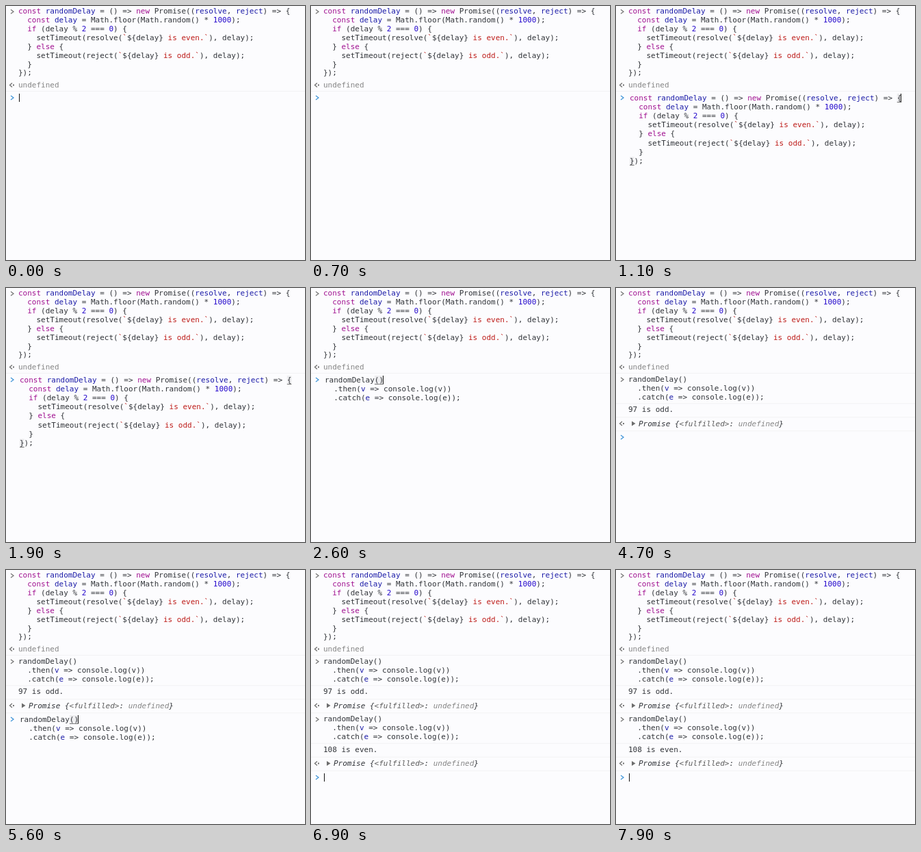
An HTML page with a canvas for the animation above (8 s loop, 437x371 px).

```html
<!DOCTYPE html>
<html lang="en">
<head>
<meta charset="utf-8">
<title>Console session</title>
<style>
  html, body { margin: 0; width: 100%; height: 100%; overflow: hidden; background: #fcfcfe; }
  canvas { display: block; width: 437px; height: 371px; }
</style>
</head>
<body>
<canvas></canvas>
<script>
const WIDTH = 437, HEIGHT = 371, LOOP = 8000, BLINK = 500;
const FONT = '11px "DejaVu Sans Mono", monospace';
const INK = '#303338', GREY = '#858585', PROMPT = '#4296d8';

const definition = [
  'const randomDelay = () => new Promise((resolve, reject) => {',
  '  const delay = Math.floor(Math.random() * 1000);',
  '  if (delay % 2 === 0) {',
  '    setTimeout(resolve(`${delay} is even.`), delay);',
  '  } else {',
  '    setTimeout(reject(`${delay} is odd.`), delay);',
  '  }',
  '});'
];
const call = ['randomDelay()', '  .then(v => console.log(v))', '  .catch(e => console.log(e));'];

// Prompt states; brackets are [line, column] pairs.
const definitionBrackets = [[0, 59], [7, 0]];
const callBrackets = [[0, 11], [0, 12]];
const states = [
  { start: 0, y: 134, runs: 0 },
  { start: 1000, y: 134, runs: 0, code: definition, brackets: definitionBrackets },
  { start: 2500, y: 134, runs: 0, code: call, brackets: callBrackets },
  { start: 3800, y: 218, runs: 1 },
  { start: 5300, y: 218, runs: 1, code: call, brackets: callBrackets },
  { start: 6500, y: 303, runs: 2 }
];
const runs = [{ y: 133.3, output: '97 is odd.' }, { y: 217.7, output: '108 is even.' }];

const syntax = [
  [/\b(?:const|new|if|else)\b/g, '#a01090'],
  [/(?<=const )\w+|\b[ve](?= =>)|resolve(?=, )|reject(?=\) =>)/g, '#1c1ca8'],
  [/\b\d+\b/g, '#2408cc'],
  [/`| is \w+\./g, '#bd1b18']
];

const canvas = document.querySelector('canvas');
const ctx = canvas.getContext('2d');
const ratio = window.devicePixelRatio || 1;
canvas.width = WIDTH * ratio;
canvas.height = HEIGHT * ratio;
ctx.scale(ratio, ratio);
ctx.font = FONT;
const advance = ctx.measureText('0').width;

function text(string, x, y, color = INK, style = '') {
  ctx.font = style + FONT;
  ctx.fillStyle = color;
  ctx.fillText(string, x, y + 3.5);
}

function codeLine(line, x, y) {
  const colors = Array(line.length).fill(INK);
  for (const [pattern, color] of syntax) {
    for (const match of line.matchAll(pattern)) {
      colors.fill(color, match.index, match.index + match[0].length);
    }
  }
  for (let from = 0, to; from < line.length; from = to) {
    to = from + 1;
    while (to < line.length && colors[to] === colors[from]) to++;
    text(line.slice(from, to), x + from * advance, y, colors[from]);
  }
}

function codeBlock(lines, x, y, lineHeight) {
  lines.forEach((line, i) => codeLine(line, x, y + i * lineHeight));
}

function chevron(x, y, width, color) {
  ctx.strokeStyle = color;
  ctx.lineWidth = 1.3;
  ctx.beginPath();
  ctx.moveTo(x, y - 3);
  ctx.lineTo(x + width, y);
  ctx.lineTo(x, y + 3);
  ctx.stroke();
}

function resultArrow(y) {
  chevron(9, y, -3.5, '#707070');
  ctx.fillStyle = '#707070';
  ctx.fillRect(10, y - 1, 2, 2);
}

function separator(y) {
  ctx.fillStyle = '#f2f2f4';
  ctx.fillRect(0, y, WIDTH, 1);
}

function echo(lines, y) {
  chevron(7, y + 0.5, 4, '#777');
  codeBlock(lines, 18, y, 12.87);
}

function promiseResult(y) {
  resultArrow(y);
  ctx.fillStyle = '#6e6e6e';
  ctx.beginPath();
  ctx.moveTo(23, y - 3.5);
  ctx.lineTo(28.5, y);
  ctx.lineTo(23, y + 3.5);
  ctx.fill();
  const parts = [['Promise {', INK], ['<fulfilled>', '#5c5c5c'], [': ', INK], ['undefined', GREY], ['}', INK]];
  let x = 33;
  for (const [part, color] of parts) {
    text(part, x, y, color, 'italic ');
    x += part.length * advance;
  }
}

function run({ y, output }) {
  echo(call, y);
  separator(y + 35);
  text(output, 18, y + 44.3);
  separator(y + 55);
  promiseResult(y + 64.8);
  separator(y + 75);
}

function prompt({ start, y, code = [''], brackets = [] }, time) {
  const lineHeight = 13.2;
  chevron(7, y, 4, PROMPT);
  for (const [line, column] of brackets) {
    const x = 20 + column * advance, top = y + line * lineHeight - 6;
    ctx.fillStyle = '#ededef';
    ctx.fillRect(x, top, advance, 12);
    ctx.fillStyle = '#777';
    ctx.fillRect(x, Math.round(top + 12), advance, 1);
  }
  codeBlock(code, 20, y, lineHeight);
  if (Math.floor((time - start) / BLINK) % 2 === 0) {
    ctx.fillStyle = '#111';
    ctx.fillRect(Math.round(19 + code[0].length * advance), y - 6, 1, 12);
  }
}

function draw(now) {
  const time = now % LOOP;
  const state = states.findLast(({ start }) => start <= time);
  ctx.fillStyle = '#fcfcfe';
  ctx.fillRect(0, 0, WIDTH, HEIGHT);
  echo(definition, 7.8);
  resultArrow(115.5);
  text('undefined', 18, 115, GREY);
  separator(124);
  runs.slice(0, state.runs).forEach(run);
  prompt(state, time);
  requestAnimationFrame(() => draw(performance.now() - origin));
}

const origin = performance.now();
draw(0);
</script>
</body>
</html>
```
